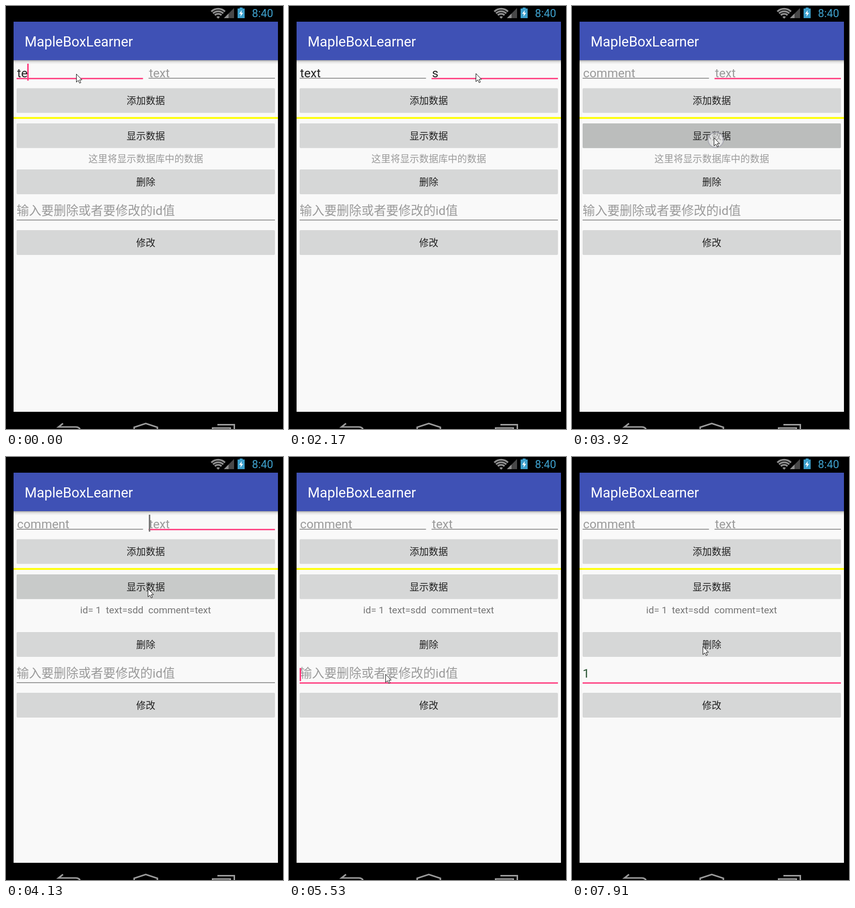
Recreate the animation shown at these times as an HTML page. Size 549x836 px, loop 8.05 s.

```html
<!DOCTYPE html>
<html lang="zh-CN">
<head>
<meta charset="utf-8">
<style>
html, body { margin: 0; width: 100%; height: 100%; overflow: hidden; background: #000; }
svg { display: block; width: 549px; height: 836px; }
text { font-family: Roboto, "Noto Sans CJK SC", "Noto Sans CJK", sans-serif; white-space: pre; }
.label { font-size: 18.95px; fill: #202020; text-anchor: middle; }
.field { font-size: 24.3px; fill: #202020; }
#key { font-size: 24.5px; }
#key:not(.hint) { fill: #24502f; }
.hint { fill: #9a9a9a; }
.button { fill: #d6d7d7; }
.nav { fill: none; stroke: #9b9b9b; stroke-width: 3; }
</style>
</head>
<body>
<svg viewBox="0 0 549 836">
  <defs>
    <linearGradient id="shade" x2="0" y2="1">
      <stop stop-color="#000" stop-opacity=".34"/>
      <stop offset=".4" stop-color="#000" stop-opacity=".1"/>
      <stop offset="1" stop-color="#000" stop-opacity="0"/>
    </linearGradient>
    <clipPath id="fan"><path d="M420.5 25L404 8V2H437V8Z"/></clipPath>
  </defs>

  <g clip-path="url(#fan)" fill="none" stroke="#8f8f8f" stroke-width="3.6">
    <circle cx="420.5" cy="25" r="19.5"/>
    <circle cx="420.5" cy="25" r="14.5"/>
    <circle cx="420.5" cy="25" r="9.5"/>
    <circle cx="420.5" cy="25" r="3" fill="#8f8f8f"/>
  </g>
  <path d="M452 4V24H432Z" fill="#484848"/>
  <path d="M441 15V24H432Z" fill="#8f8f8f"/>
  <path d="M463 3H469V5H473V24H459V5H463Z" fill="#3c9fcb"/>
  <path d="M467.5 8L462 15.5H465.5L464.5 21L470 13.5H466.5Z" fill="#fff"/>
  <text x="487.5" y="22" font-size="21.8" fill="#3fa3cf">8:40</text>

  <rect x="15" y="31" width="524" height="771" fill="#f9f9f9"/>
  <rect x="15" y="107" width="524" height="8" fill="url(#shade)"/>
  <rect x="15" y="31" width="524" height="76" fill="#3f51b5"/>
  <text x="37" y="80" font-size="27.5" fill="#fff">MapleBoxLearner</text>

  <rect id="leftLine" x="21" y="142" width="250.5"/>
  <rect id="rightLine" x="282.5" y="142" width="250.5"/>
  <text id="left" class="field" x="22" y="140.5"/>
  <text id="right" class="field" x="283.5" y="140.5"/>

  <rect class="button" x="21" y="162.5" width="512" height="48.7" rx="2"/>
  <text class="label" x="277" y="194">添加数据</text>
  <rect x="15" y="219.5" width="524" height="3.5" fill="#ff0"/>
  <rect class="button" x="21" y="232" width="512" height="48.7" rx="2"/>
  <rect id="pressed" x="21" y="232" width="512" height="48.7" rx="2" fill="#bbbdbc"/>
  <text class="label" x="277" y="264">显示数据</text>
  <text id="empty" class="label hint" x="277" y="309">这里将显示数据库中的数据</text>
  <text id="row" x="147" y="309" font-size="19.2" fill="#757575">id= 1  text=sdd  comment=text</text>

  <g id="lower">
    <rect class="button" x="21" y="323" width="512" height="49" rx="2"/>
    <text class="label" x="277" y="355">删除</text>
    <text id="key" class="field" x="21" y="413"/>
    <rect id="keyLine" x="21" y="422.3" width="512"/>
    <rect class="button" x="21" y="443" width="512" height="49" rx="2"/>
    <text class="label" x="277" y="475">修改</text>
  </g>

  <rect id="caret" width="3"/>
  <g id="pointer">
    <circle id="touch" cx="4" cy="4.5" r="15" fill="#fff" fill-opacity=".55" stroke="#8d8da0" stroke-opacity=".5" stroke-width="2"/>
    <path d="M.5 .5V16.5L4.2 13L6.8 18.5L9.3 17.4L6.8 12H11.5Z" fill="#fff" stroke="#111"/>
  </g>

  <path class="nav" d="M113 825L104 832H138Q146 832 147 838"/>
  <path class="nav" d="M254 840V832.5L277 825L300 832.5V840"/>
  <path class="nav" d="M419 827.5H452.5V840M409.5 840V834H444.5V840"/>
</svg>
<script>
const LOOP = 8050, STEP = 70, BLINK = 490, TOUCH = 210;
const PINK = '#ff4081';
const LOADED = 3990, FADE = 280;
const HINTS = { left: 'comment', right: 'text', key: '输入要删除或者要修改的id值' };

// Each entry overrides part of the form state and restarts the caret's blinking.
const edits = [
  { at: 0, focus: 'left', caret: PINK, left: 'te', right: '', key: '' },
  { at: 210, left: 'tex' },
  { at: 350, left: 'text' },
  { at: 1400, focus: 'right' },
  { at: 1750, right: 's' },
  { at: 2240, right: 'sd' },
  { at: 2450, right: 'sdd' },
  { at: 3150, left: '', right: '', caret: '#777' },
  { at: 5390, focus: 'key', caret: PINK },
  { at: 7140 },
  { at: 7490, key: '1' }
];
const moves = [
  { from: 0, to: 1, x: 139, y: 134 },
  { from: 700, to: 1260, x: 370, y: 133 },
  { from: 2450, to: 2730, x: 280, y: 180 },
  { from: 3430, to: 3850, x: 281, y: 260 },
  { from: 4270, to: 5110, x: 191, y: 429 },
  { from: 6230, to: 6650, x: 199, y: 473 },
  { from: 6720, to: 6930, x: 205, y: 437 },
  { from: 7490, to: 7910, x: 259, y: 374 }
];
const clicks = { right: 1260, add: 3080, show: 3920, key: 5180, again: 7140 };

const $ = id => document.getElementById(id);
const set = (id, attrs) => {
  for (const name in attrs) $(id).setAttribute(name, attrs[name]);
};
const show = (id, on) => set(id, { visibility: on ? 'visible' : 'hidden' });
const progress = (t, from, to) => Math.min(1, Math.max(0, (t - from) / (to - from)));
const easeOut = k => 1 - (1 - k) ** 2;

function pointerAt(t) {
  let { x, y } = moves[0];
  for (const move of moves) {
    const k = easeOut(progress(t, move.from, move.to));
    x += (move.x - x) * k;
    y += (move.y - y) * k;
  }
  return [Math.round(x), Math.round(y)];
}

function drawField(id, value, focused) {
  const text = value || HINTS[id];
  if ($(id).textContent !== text) $(id).textContent = text;
  $(id).classList.toggle('hint', !value);
  set(id + 'Line', { height: focused ? 2.7 : 1.4, fill: focused ? PINK : '#777' });
}

function drawCaret(t, form) {
  const { focus } = form, low = focus === 'key';
  const width = form[focus] ? $(focus).getComputedTextLength() : 0;
  show('caret', Math.floor((t - form.at + STEP) / BLINK) % 2 === 0);
  set('caret', {
    x: Math.floor(+$(focus).getAttribute('x') + width),
    y: low ? 417 : 114, height: low ? 26 : 33.5, fill: form.caret
  });
}

function draw(t) {
  const form = Object.assign({}, ...edits.filter(edit => edit.at <= t));
  for (const id in HINTS) {
    // A field lights up on touch, before it takes the focus.
    const touched = t >= clicks[id] && t < clicks[id] + TOUCH;
    drawField(id, form[id], form.focus === id || touched);
  }
  drawCaret(t, form);

  const loaded = t >= LOADED;
  show('empty', !loaded);
  show('row', loaded);
  set('lower', { transform: `translate(0 ${loaded ? 23 : 0})` });
  set('pressed', { opacity: t < clicks.show ? 0 : 1 - progress(t, LOADED, LOADED + FADE) });

  set('pointer', { transform: `translate(${pointerAt(t)})` });
  show('touch', Object.values(clicks).some(at => t >= at && t < at + TOUCH));
}

function tick() {
  const t = performance.now() % LOOP;
  draw(Math.floor(t / STEP) * STEP);
  requestAnimationFrame(tick);
}
tick();
</script>
</body>
</html>
```
